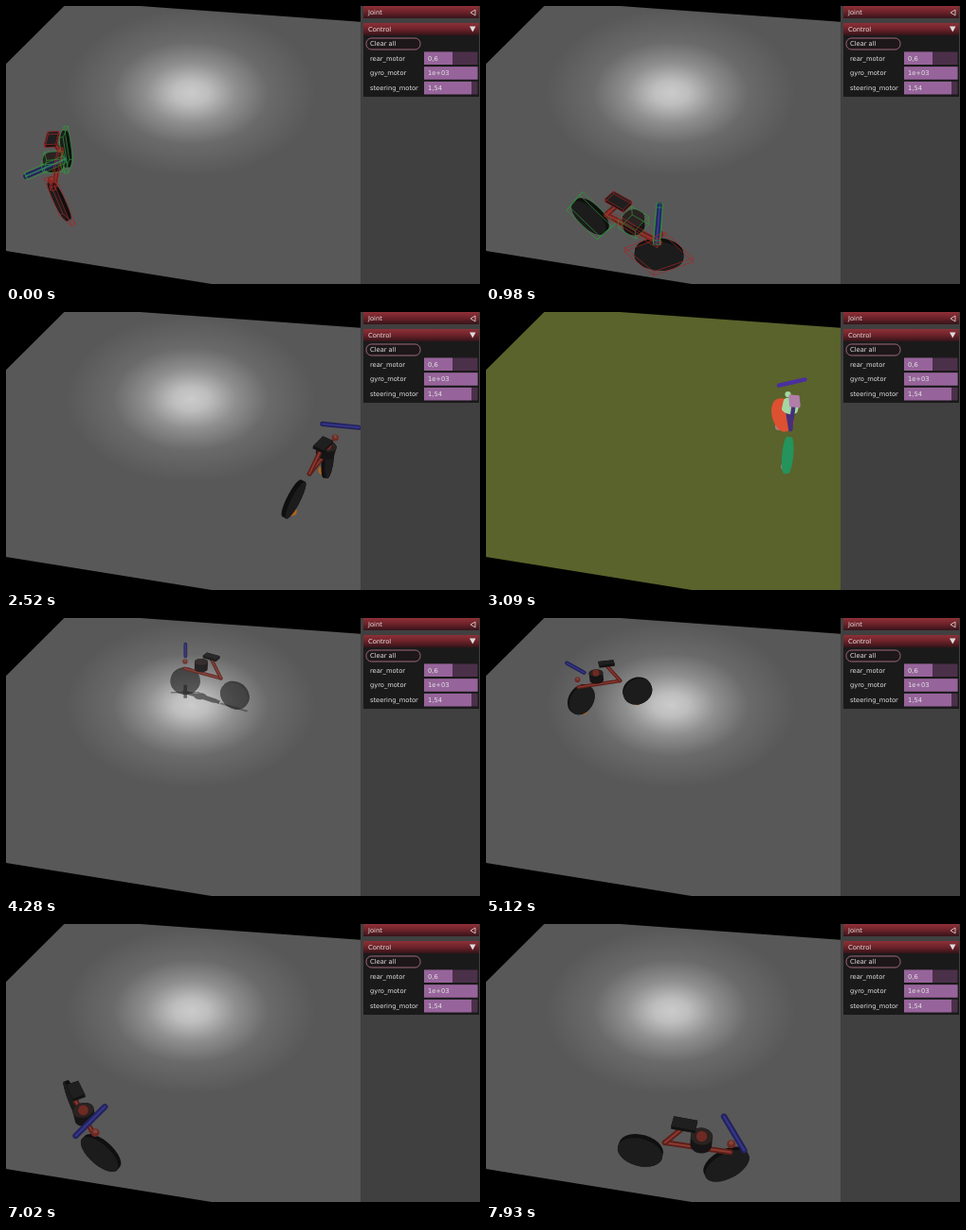
An HTML page that plays this animation: 500 px wide and 294 px high, repeating every 8 s.

```html
<!DOCTYPE html>
<html lang="en">
<head>
<meta charset="utf-8">
<title>Bike simulation</title>
<style>
  html, body { margin: 0; width: 100%; height: 100%; overflow: hidden; background: #000; }
  svg { display: block; width: 100vw; height: 100vh; }
  text { font: 6.7px "DejaVu Sans", sans-serif; fill: #e4e4e4; }
</style>
</head>
<body>
<svg viewBox="0 0 500 294">
  <defs>
    <radialGradient id="lit" gradientUnits="userSpaceOnUse" cx="0" cy="0" r="1" gradientTransform="translate(195 92) scale(132 88)">
      <stop offset="0" stop-color="#cbcbcb"/>
      <stop offset=".14" stop-color="#bebebe"/>
      <stop offset=".36" stop-color="#8f8f8f"/>
      <stop offset=".62" stop-color="#6a6a6a"/>
      <stop offset="1" stop-color="#585858"/>
    </radialGradient>
    <radialGradient id="litGrid" gradientUnits="userSpaceOnUse" cx="0" cy="0" r="1" gradientTransform="translate(195 92) scale(132 88)">
      <stop offset="0" stop-color="#c4c4c4"/>
      <stop offset=".4" stop-color="#7c7c7c"/>
      <stop offset="1" stop-color="#4c4c4c"/>
    </radialGradient>
    <linearGradient id="bar" x2="0" y2="1">
      <stop offset="0" stop-color="#8e3038"/>
      <stop offset=".5" stop-color="#6c2229"/>
      <stop offset="1" stop-color="#35141a"/>
    </linearGradient>
    <clipPath id="view"><path d="M0 0H374V294H0z"/></clipPath>
  </defs>
  <rect width="500" height="294"/>
  <g clip-path="url(#view)">
    <path id="ground"/>
    <path id="grid" fill="none" stroke="url(#litGrid)" stroke-width=".55"/>
    <g id="shadow" opacity=".55"></g>
    <g id="bike" stroke-linecap="round"></g>
    <g id="boxes" fill="none" stroke-width=".7"></g>
  </g>
  <g id="panel"></g>
</svg>
<script>
const $ = id => document.getElementById(id);
const LOOP = 8000, FLOOR = -1.8, RAD = Math.PI / 180;
const FOCAL = 438, COS = 0.759, SIN = 0.651, EYE = 10, ORBIT = 5.4;

// Camera: world points are [right, forward, up]
function project([x, y, z]) {
  const h = z - EYE, d = y * COS - h * SIN;
  return [187 + FOCAL * x / d, 147 - FOCAL * (y * SIN + h * COS) / d, d];
}
const fix = p => p[0].toFixed(2) + ' ' + p[1].toFixed(2);
const poly = pts => 'M' + pts.map(fix).join('L') + 'z';
const line = (a, b) => 'M' + fix(a) + 'L' + fix(b);

// Floor square, in its own rotated axes
const A0 = 7.09, A1 = 28.1, B0 = -13.56, B1 = 7.9, CELLS = 50;
const floorPoint = (a, b) => project([0.177 * a + 0.984 * b, 0.984 * a - 0.177 * b, FLOOR]);
$('ground').setAttribute('d', poly([floorPoint(A0, B0), floorPoint(A1, B0), floorPoint(A1, B1), floorPoint(A0, B1)]));
let mesh = '';
for (let i = 0; i <= CELLS; i++) {
  const a = A0 + (A1 - A0) * i / CELLS, b = B0 + (B1 - B0) * i / CELLS;
  mesh += line(floorPoint(a, B0), floorPoint(a, B1)) + line(floorPoint(A0, b), floorPoint(A1, b));
}
$('grid').setAttribute('d', mesh);

// Position of the bike on its circle, in degrees
const turn = [[0, 208.8], [980, 258.8], [3090, 373.5], [4280, 442], [5970, 535], [8000, 644.5]];
function angleAt(t) {
  let i = 1;
  while (turn[i][0] < t) i++;
  const [t0, a0] = turn[i - 1], [t1, a1] = turn[i];
  return (a0 + (a1 - a0) * (t - t0) / (t1 - t0)) * RAD;
}

// Parts in local axes [outward, along, up] around the gyro
const heading = 66 * RAD;
const corner = [-0.44, -1.04, -0.4], head = [0.3, 0.87, -0.4], seatAt = [-0.21, -0.5, 0.6];
const parts = [
  { kind: 'disc', at: [-0.8, -1.79, -1.1], yaw: -21 * RAD, r: 0.75, half: 0.08, roll: 0, color: '#1c1c1c', side: '#0f0f0f', id: '#24935c', box: '#2a9a35' },
  { kind: 'disc', at: [0.25, 0.83, -1.1], yaw: 8 * RAD, r: 0.77, half: 0.07, roll: 0.45, color: '#1c1c1c', side: '#0f0f0f', id: '#dc5131', box: '#a82626' },
  { kind: 'drum', at: [0, 0, 0], yaw: heading, r: 0.33, half: 0.2, color: '#2b2222', side: '#161414', id: '#a4d8a2', box: '#2a9a35' },
  { kind: 'slab', at: seatAt, yaw: heading, size: [0.36, 0.2, 0.06], color: '#1f1f1f', side: '#121212', id: '#b17fa9', box: '#a82626' },
  { kind: 'rod', a: corner, b: head, w: 0.17, color: '#5c1f1a', shine: '#8c3a30', id: '#453079', box: '#a82626', yaw: heading },
  { kind: 'rod', a: corner, b: [-0.21, -0.5, 0.5], w: 0.17, color: '#5c1f1a', shine: '#8c3a30', id: '#453079' },
  { kind: 'rod', a: [1.02, 0.93, 0.6], b: [-0.3, 0.75, 0.6], w: 0.18, color: '#22225c', shine: '#36368a', id: '#4b2f9f', box: '#2a9a35', yaw: 8 * RAD },
  { kind: 'ball', at: [0.3, 0.85, 0], r: 0.13, color: '#6e2a22', id: '#a4d8a2' }
];
const contacts = [[-0.76, -1.79, -1.74], [0.2, 0.83, -1.74]]
  .map(at => ({ kind: 'ball', at, r: 0.18, color: '#b0641c', id: '#a58090', contact: true }));

const ring = Array.from({ length: 28 }, (_, i) => i / 28 * 2 * Math.PI);
const corners = Array.from({ length: 8 }, (_, i) => [i & 1 ? 1 : -1, i & 2 ? 1 : -1, i & 4 ? 1 : -1]);

// Maps a part's own axes to the bike's axes
function placer({ at, yaw }) {
  const c = Math.cos(yaw), s = Math.sin(yaw);
  return ([u, v, z]) => [at[0] + u * c - v * s, at[1] + u * s + v * c, at[2] + z];
}

function outline(p) {
  const place = placer(p);
  return [-1, 1].map(k => {
    if (p.kind === 'disc') return ring.map(q => place([k * p.half, p.r * Math.cos(q), p.r * Math.sin(q)]));
    if (p.kind === 'drum') return ring.map(q => place([p.r * Math.cos(q), p.r * Math.sin(q), k * p.half]));
    const [l, w, h] = p.size;
    return [[-l, -w], [l, -w], [l, w], [-l, w]].map(([u, v]) => place([u, v, k * h]));
  });
}

function hull(pts) {
  const sorted = [...pts].sort((a, b) => a[0] - b[0] || a[1] - b[1]);
  const half = list => {
    const out = [];
    for (const p of list) {
      while (out.length > 1) {
        const [a, b] = out.slice(-2);
        if ((b[0] - a[0]) * (p[1] - a[1]) - (b[1] - a[1]) * (p[0] - a[0]) > 0) break;
        out.pop();
      }
      out.push(p);
    }
    return out.slice(0, -1);
  };
  return half(sorted).concat(half(sorted.reverse()));
}

const mean = (pts, k) => pts.reduce((n, p) => n + p[k], 0) / pts.length;
const mid = (a, b) => a.map((v, i) => (v + b[i]) / 2);

function mover(th) {
  const c = Math.cos(th), s = Math.sin(th);
  return ([r, a, z]) => [0.145 + (ORBIT + r) * c - a * s, 13.34 + (ORBIT + r) * s + a * c, z];
}

function drawPart(p, see, mode, flat) {
  const plain = flat ? '#151515' : mode === 'ids' ? p.id : null;
  const fill = plain || (p.contact && mode === 'wire' ? '#7fa9a9' : p.color);
  if (p.kind === 'ball') {
    const c = see(p.at), r = p.r * FOCAL / c[2];
    let out = `<circle cx="${c[0]}" cy="${c[1]}" r="${r}" fill="${fill}"/>`;
    if (!plain) out += `<circle cx="${c[0]}" cy="${c[1] - r * .3}" r="${r * .5}" fill="#fff" opacity=".13"/>`;
    return out;
  }
  if (p.kind === 'rod') {
    const a = see(p.a), b = see(p.b), w = p.w * FOCAL * 2 / (a[2] + b[2]);
    let out = `<path d="${line(a, b)}" stroke="${fill}" stroke-width="${w}"/>`;
    if (!plain) out += `<path d="${line(a, b)}" stroke="${p.shine}" stroke-width="${w * .35}"/>`;
    return out;
  }
  const rings = outline(p).map(list => list.map(see));
  const near = mean(rings[0], 2) < mean(rings[1], 2) ? rings[0] : rings[1];
  const edge = mode === 'wire' && p.kind !== 'slab' ? ' stroke="#555" stroke-width=".5" stroke-dasharray="2 1"' : '';
  const alpha = mode === 'shade' && p.kind === 'disc' ? ' opacity=".72"' : '';
  let out = `<g${alpha}><path d="${poly(hull(rings.flat()))}" fill="${plain || p.side}"${edge}/>`;
  if (!plain) out += `<path d="${poly(near)}" fill="${fill}"${edge}/>`;
  if (p.kind === 'drum' && ['contacts', 'plain'].includes(mode))
    out += `<circle cx="${mean(near, 0)}" cy="${mean(near, 1)}" r="${0.16 * FOCAL / near[0][2]}" fill="#6e2a22"/>`;
  return out + '</g>';
}

// Corners of a part's box in its own axes; wheel boxes roll with the wheel
function boxCorner(p, [i, j, k], th) {
  if (p.kind === 'slab') return [i * p.size[0], j * p.size[1], k * p.size[2]];
  if (p.kind === 'drum') return [i * p.r, j * p.r, k * p.half];
  if (p.kind === 'rod') {
    const len = Math.hypot(p.a[0] - p.b[0], p.a[1] - p.b[1]);
    return [i * len / 2, j * p.w / 2, k * p.w / 2];
  }
  const q = th * (ORBIT + p.at[0]) / p.r + p.roll, c = Math.cos(q), s = Math.sin(q);
  return [i * p.half, p.r * (j * c - k * s), p.r * (j * s + k * c)];
}

function drawBox(p, see, th) {
  const place = placer({ at: p.at || mid(p.a, p.b), yaw: p.yaw });
  const v = corners.map(q => see(place(boxCorner(p, q, th))));
  let d = '';
  for (let i = 0; i < 8; i++)
    for (const bit of [1, 2, 4]) if (!(i & bit)) d += line(v[i], v[i | bit]);
  return `<path d="${d}" stroke="${p.box}"/>`;
}

// Display modes and the times at which they begin
const modes = [[0, 'boxes'], [1450, 'wire'], [2300, 'contacts'], [2730, 'ids'], [3750, 'shade'], [5080, 'contacts'], [6900, 'plain']];
const modeAt = t => modes.filter(m => m[0] <= t).pop()[1];

function render(t) {
  const mode = modeAt(t), th = angleAt(t), move = mover(th);
  const see = p => project(move(p));
  const flat = p => { const [x, y] = move(p); return project([x, y, FLOOR]); };
  const wire = mode === 'wire';
  $('ground').setAttribute('fill', wire ? 'none' : mode === 'ids' ? '#5a632b' : 'url(#lit)');
  $('grid').style.display = wire ? '' : 'none';

  const list = ['wire', 'ids', 'contacts'].includes(mode) ? parts.concat(contacts) : parts;
  const depth = p => see(p.at || mid(p.a, p.b))[2] + (p.contact && !wire ? 0.5 : 0);
  const order = list.map(p => [depth(p), p]).sort((a, b) => b[0] - a[0]);
  $('bike').innerHTML = order.map(([, p]) =>
    `<g opacity="${wire && !p.contact ? .5 : 1}">${drawPart(p, see, mode)}</g>`).join('');
  $('bike').setAttribute('opacity', mode === 'shade' ? .85 : 1);
  $('shadow').innerHTML = mode === 'shade' ? parts.map(p => drawPart(p, flat, mode, true)).join('') : '';
  $('boxes').innerHTML = mode === 'boxes' ? parts.filter(p => p.box).map(p => drawBox(p, see, th)).join('') : '';
}

// Side panel
const rect = (x, y, w, h, fill) => `<rect x="${x}" y="${y}" width="${w}" height="${h}" fill="${fill}"/>`;
const label = (x, y, s) => `<text x="${x}" y="${y}">${s}</text>`;
const sliders = [['rear_motor', '0,6', 30], ['gyro_motor', '1e+03', 56.5], ['steering_motor', '1,54', 50]];
$('panel').innerHTML =
  rect(374, 0, 126, 294, '#404040') +
  rect(377, 0, 122, 13, 'url(#bar)') + label(382, 9, 'Joint') +
  '<path d="M495 4v6l-5-3z" fill="none" stroke="#ddd" stroke-width=".8"/>' +
  rect(377, 18, 122, 78, '#1a1a1a') + rect(377, 18, 122, 13, 'url(#bar)') + label(382, 26.6, 'Control') +
  '<path d="M489 21.500h6.500l-3.250 6z" fill="#ddd"/>' +
  '<rect x="380" y="34" width="57" height="12" rx="5.500" fill="#1d1719" stroke="#a06a7c"/>' + label(384, 42.3, 'Clear all') +
  sliders.map(([name, value, w], i) => {
    const y = 48.5 + i * 15.7;
    return label(384, y + 9.2, name) + rect(441, y, 56.5, 13.5, '#4b3049') +
      rect(441, y, w, 13.5, '#96649a') + label(445, y + 9.2, value);
  }).join('');

function tick(now) {
  render(now % LOOP);
  requestAnimationFrame(tick);
}
render(0);
requestAnimationFrame(tick);
</script>
</body>
</html>
```
